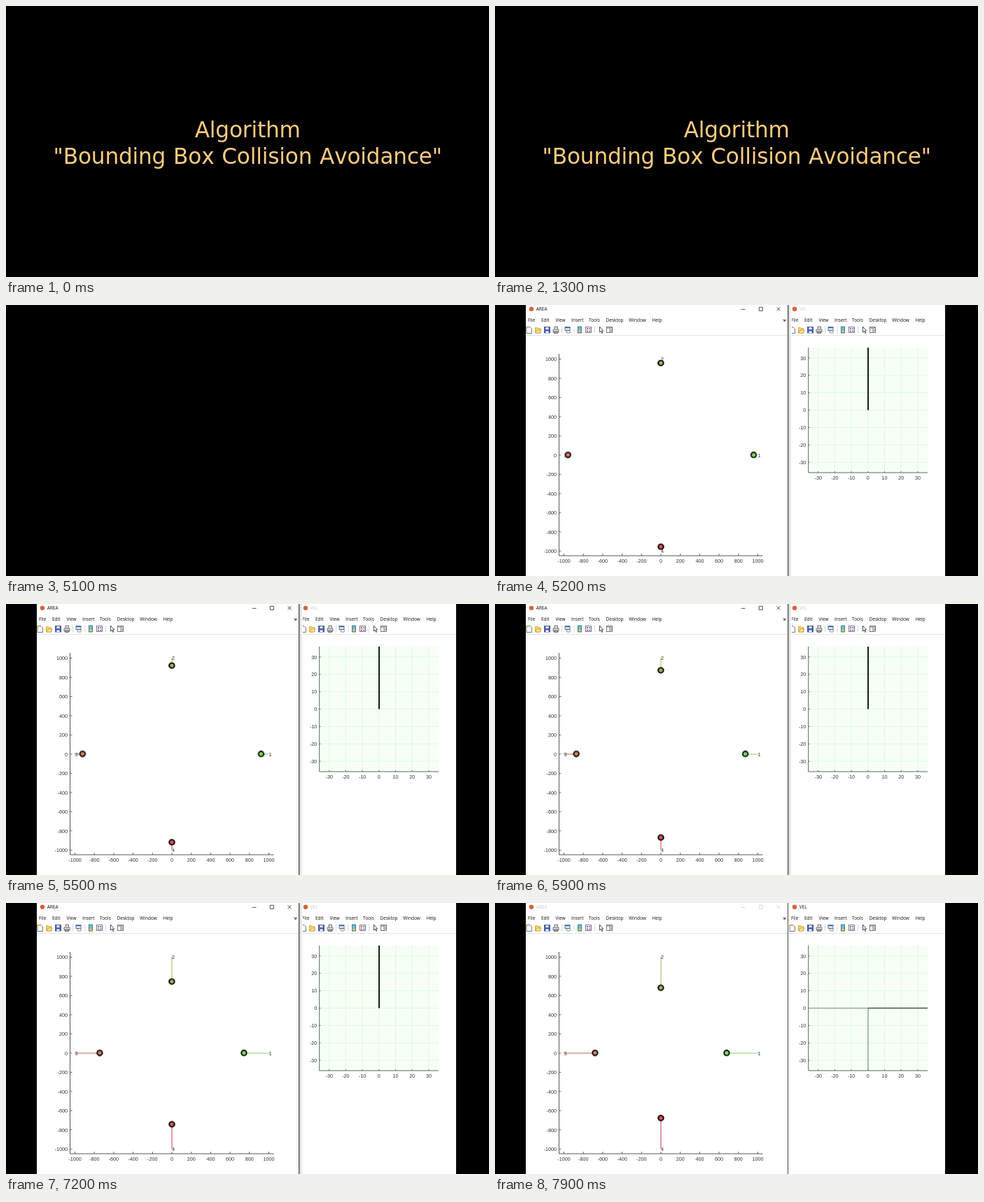
Write an HTML page that moves like this. It is 690 px wide and 388 px high and loops after 8 s.

```html
<!DOCTYPE html>
<html lang="en">
<head>
<meta charset="utf-8">
<title>Bounding Box Collision Avoidance</title>
<style>
  html, body { margin: 0; width: 100%; height: 100%; overflow: hidden; background: #000; }
  svg { position: absolute; left: 0; top: 0; width: 690px; height: 388px; }

  .title, .scene, .bot, .trail, .on-area, .on-vel, .ahead, .cross {
    animation: 8s step-end -20ms infinite;
  }
  .title {
    animation-name: wipe;
    font: 31.1px Verdana, "DejaVu Sans", sans-serif;
    font-kerning: none;
    letter-spacing: -.14px;
    word-spacing: 1.1px;
  }
  .scene { animation-name: appear; }
  .bot { animation-name: drive; }
  .trail { animation-name: trail; }
  .on-area { animation-name: area; }
  .on-vel { animation-name: vel; }
  .ahead { animation-name: ahead; }
  .cross { animation-name: cross; }

  @keyframes wipe {
    0% { clip-path: inset(0 0 0 0); }
    53.75% { clip-path: inset(0 110px 0 0); animation-timing-function: steps(8); }
    63.75%, 100% { clip-path: inset(0 638px 0 0); }
  }
  @keyframes appear { 0% { opacity: 0; } 65%, 100% { opacity: 1; } }
  @keyframes trail { 0% { opacity: 0; } 66.25%, 100% { opacity: 1; } }
  @keyframes drive {
    0% { transform: translateX(132.6px); }
    65% { transform: translateX(132.6px); animation-timing-function: steps(7); }
    73.75% { transform: translateX(120.7px); animation-timing-function: steps(13); }
    90% { transform: translateX(103px); animation-timing-function: steps(7); }
    98.75%, 100% { transform: translateX(94px); }
  }
  /* focus flips between the two windows */
  @keyframes area {
    0%, 82.5%, 95% { opacity: 1; }
    81.25%, 93.75%, 98.75%, 100% { opacity: .22; }
  }
  @keyframes vel {
    0%, 82.5%, 95% { opacity: .22; }
    81.25%, 93.75%, 98.75%, 100% { opacity: 1; }
  }
  @keyframes ahead { 0%, 82.5% { opacity: 1; } 81.25%, 98.75%, 100% { opacity: 0; } }
  @keyframes cross { 0%, 82.5% { opacity: 0; } 81.25%, 98.75%, 100% { opacity: 1; } }

  .ui { font: 6.5px "Open Sans", "Noto Sans", sans-serif; fill: #111; }
  .num { font: 7.2px "Liberation Sans", Arial, sans-serif; fill: #333; }
  .end { text-anchor: end; }
  .mid { text-anchor: middle; }
</style>
</head>
<body>
<svg class="title" viewBox="0 0 690 388" fill="#ffcc80">
  <text x="345.2" y="188" text-anchor="middle">Algorithm</text>
  <text x="345.3" y="226" text-anchor="middle">"Bounding Box Collision Avoidance"</text>
</svg>

<svg class="scene" viewBox="0 0 690 388">
  <defs>
    <linearGradient id="shade">
      <stop offset="0" stop-color="#777"/>
      <stop offset=".4" stop-color="#ddd"/>
      <stop offset="1" stop-color="#fff"/>
    </linearGradient>
    <clipPath id="reach"><rect y="-8" width="138.5" height="16"/></clipPath>
    <clipPath id="left"><rect x="44" width="374" height="388"/></clipPath>
    <clipPath id="right"><rect x="43" width="224" height="388"/></clipPath>
    <g id="tools" fill="none" stroke="#555" stroke-width=".8">
      <path d="M45 31.5h5l2.5 2.5v6.5h-7.5z" fill="#fff"/>
      <circle cx="45.5" cy="32" r="1.3" fill="#e8a23a" stroke="none"/>
      <path d="M57.5 40v-7.5h3l1 1.2h3.5v6.3z" fill="#f6d467" stroke="#c99a2c"/>
      <path d="M58 40l2-4h6l-2 4z" fill="#ffe69a" stroke="#c99a2c"/>
      <rect x="70.5" y="31.5" width="8" height="8.5" fill="#4c60b4" stroke="#34458e"/>
      <path d="M72.5 32h4v3h-4zM72.5 37.5h4v2.5h-4z" fill="#fff" stroke="none"/>
      <path d="M85 34.5v-3.5h4.5v3.5M83 35h8v4h-8zM84.5 38h5v2.5h-5z" fill="#ddd"/>
      <rect x="100" y="31.5" width="7" height="5" fill="#d5e2f3" stroke="#456"/>
      <path d="M100 32.3h7" stroke="#446fb0" stroke-width="1.4"/>
      <path d="M102 38.5q0-2 2-2h1.5q2 0 2 2t-2 1.5h-1.5q-2 0-2-1.5z" stroke="#567"/>
      <rect x="118.5" y="31" width="5" height="9" fill="#65c3d8" stroke="#456"/>
      <path d="M119 38h4" stroke="#eecb58" stroke-width="2"/>
      <rect x="129.5" y="31.5" width="8" height="8" fill="#fff" stroke="#557"/>
      <path d="M131 34h2M131 37.5h2" stroke="#d04848" stroke-width="1.8"/>
      <path d="M134 34h2.5M134 37.5h2.5" stroke="#4862c4" stroke-width="1.4"/>
      <path d="M149.5 31v8l1.8-1.6 1.4 3 1.1-.5-1.4-2.9h2.3z" fill="#fff" stroke="#222"/>
      <rect x="159.5" y="31.5" width="8" height="8" fill="#fff"/>
      <path d="M160 33h7M164 33v6.5M165 35.5h2M165 37.5h2"/>
      <path d="M95.5 30.5v10M113 30.5v10M142.5 30.5v10" stroke="#ccc"/>
    </g>
  </defs>

  <rect x="44" width="599" height="388" fill="#fff"/>

  <g clip-path="url(#left)">
    <g class="chrome"></g>
    <g class="on-area">
      <text class="ui" x="58.7" y="8.2">AREA</text>
      <path d="M352 6.3h5.5M377.3 3.3h5v5h-5zM402.5 3.2l5 5M407.5 3.2l-5 5" fill="none" stroke="#222" stroke-width=".8"/>
    </g>
    <path d="M411.5 20.5l2.5 2M414.5 20.5v2.5h-2.5" fill="none" stroke="#222" stroke-width=".9"/>
    <path d="M91.5 70v289h291" fill="none" stroke="#444" stroke-width=".9"/>
    <g id="area-axes"></g>
    <g id="bots" transform="translate(236.9 214.6) scale(1 .992)"></g>
    <g id="tags" class="num"></g>
  </g>

  <g transform="translate(376)" clip-path="url(#right)">
    <g class="chrome"></g>
    <g class="on-vel"><text class="ui" x="58.7" y="8.2">VEL</text></g>
  </g>
  <rect x="447.5" y="61" width="170.5" height="179" fill="#f7fff5"/>
  <g id="vel-axes"></g>
  <path d="M447.7 61v179h170.3" fill="none" stroke="#465a48" stroke-width=".9"/>
  <path class="ahead" d="M533 61v89.5" stroke="#0c2410" stroke-width="2"/>
  <g class="cross" fill="none">
    <path d="M447.5 150.5h85.5M533 150.5v89.5" stroke="#6d9270" stroke-width="1.1"/>
    <path d="M533 150.5h85" stroke="#3d5c41" stroke-width="1.5"/>
  </g>

  <rect class="ahead" x="418" width="6" height="388" fill="url(#shade)"/>
  <path d="M418.5 0v388" stroke="#444"/>
</svg>

<script>
  const ns = "http://www.w3.org/2000/svg";

  function add(parent, tag, attrs, text) {
    const el = document.createElementNS(ns, tag);
    for (const key in attrs) el.setAttribute(key, attrs[key]);
    if (text !== undefined) el.textContent = text;
    return parent.appendChild(el);
  }
  const byId = id => document.getElementById(id);

  const menu = { File: 47, Edit: 66, View: 86.5, Insert: 109, Tools: 134, Desktop: 158.5, Window: 191.3, Help: 224.5 };
  for (const bar of document.querySelectorAll(".chrome")) {
    add(bar, "circle", { cx: 52, cy: 5.7, r: 3.2, fill: "#d4633a" });
    for (const name in menu) add(bar, "text", { class: "ui", x: menu[name], y: 23.6 }, name);
    add(bar, "use", { href: "#tools" });
    add(bar, "path", { d: "M43 43.5h376", stroke: "#ddd", "stroke-width": .8 });
  }

  const areaAxes = byId("area-axes"), velAxes = byId("vel-axes");
  for (let v = -1000; v <= 1000; v += 200) {
    const x = 237 + v * .1385, y = 214.9 - v * .1374;
    add(areaAxes, "path", { d: `M${x} 359v-3M91.5 ${y}h3`, stroke: "#444", "stroke-width": .8 });
    add(areaAxes, "text", { class: "num mid", x, y: 369.3 }, v);
    add(areaAxes, "text", { class: "num end", x: 88, y: y + 2.7 }, v);
  }
  for (let v = -30; v <= 30; v += 10) {
    const x = 532.8 + v * 2.37, y = 150.5 - v * 2.49;
    add(velAxes, "path", { d: `M${x} 61v179M447.5 ${y}h170.5`, stroke: "#d6f8da", "stroke-width": .8 });
    add(velAxes, "path", { d: `M${x} 240v-2M447.5 ${y}h2`, stroke: "#465a48", "stroke-width": .8 });
    add(velAxes, "text", { class: "num mid", x, y: 250.3 }, v);
    add(velAxes, "text", { class: "num end", x: 444.3, y: y + 2.7 }, v);
  }

  const bots = [["#7ee05c", "#84d562"], ["#a5b058", "#a9b15c"], ["#d9825c", "#bd6848"], ["#e2505a", "#c83a48"]];
  bots.forEach(([fill, line], i) => {
    const turn = -i * Math.PI / 2;
    const lane = add(byId("bots"), "g", { transform: `rotate(${-90 * i})`, "clip-path": "url(#reach)" });
    const bot = add(lane, "g", { class: "bot" });
    add(bot, "path", { class: "trail", d: "M0 0h60", stroke: line, "stroke-width": 1.2 });
    add(bot, "circle", { r: 3.7, fill, stroke: "#000", "stroke-width": 1.9 });
    add(byId("tags"), "text", {
      x: 236.9 + 138.5 * Math.cos(turn),
      y: 217.7 + 137.4 * Math.sin(turn)
    }, i + 1);
  });
</script>
</body>
</html>
```
